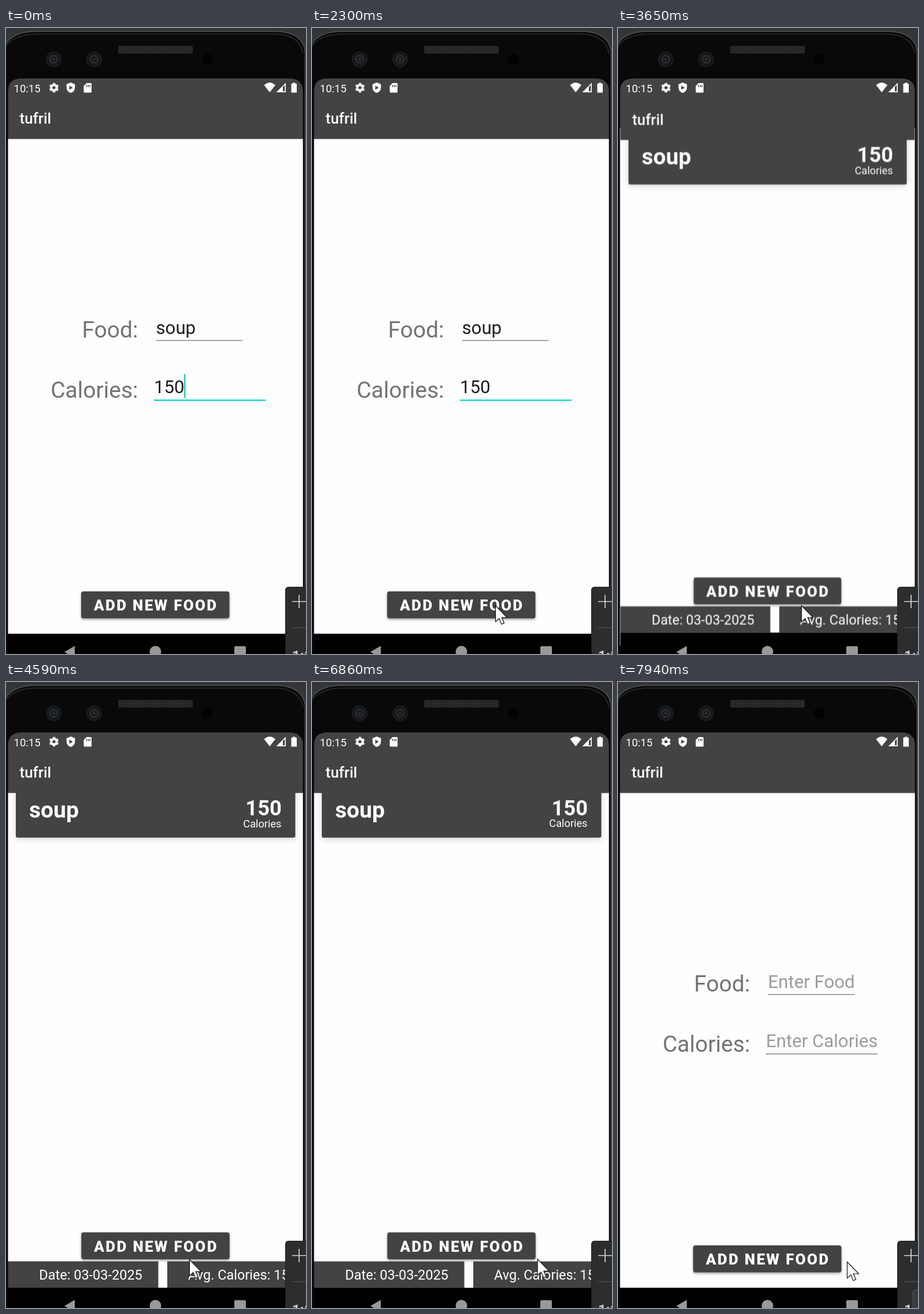
Animation, 519 px wide and 1080 px high, one loop 8 s. Source, as an HTML page:

```html
<!DOCTYPE html>
<html lang="en">
<head>
<meta charset="utf-8">
<title>Calorie tracker demo</title>
<style>
  html, body { margin: 0; width: 100%; height: 100%; overflow: hidden; background: #2f3133; }
  svg { display: block; width: 519px; height: 1080px; }
  text { font-family: Roboto, "Noto Sans", sans-serif; white-space: pre; }
  .dark { fill: #434343; }
  .white { fill: #fff; }
  .title { font-size: 26px; font-weight: 500; fill: #fff; }
  .label { font-size: 39px; fill: #737373; text-anchor: end; }
  .value { font-size: 31.2px; fill: #1d1d1d; }
  .hint { font-size: 31.2px; fill: #9b9b9b; }
  .teal { fill: #0fd8c4; }
  .rule { fill: #767676; }
  .btn-text { font-size: 26px; font-weight: 900; letter-spacing: 2.32px; fill: #fff; }
  .bar { font-size: 23.5px; fill: #fff; }
  .bold { font-weight: 700; }
  .end { text-anchor: end; }
  .raised { filter: drop-shadow(0 2px 2px rgba(0,0,0,.38)); }
  .card { filter: drop-shadow(0 2px 6px rgba(0,0,0,.17)); }

  .anim { animation: 8s linear infinite; }
  .window { transform-origin: 258.5px 597px; }
  #form-old { animation-name: leave-first; }
  #list { animation-name: list-scale, list-fade; }
  #form-new { animation-name: form-scale, form-fade; }
  #list, #form-new { animation-duration: 8s; animation-iteration-count: infinite; }
  #caret { animation-name: blink; animation-timing-function: step-end; }
  #cursor { animation-name: point; }
  #hover { animation-name: hover; animation-timing-function: step-end; }
  #tap1 { animation-name: tap1; }
  #tap1 circle { animation-name: spread1; }
  #tap2 { animation-name: tap2; }
  #tap2 circle { animation-name: spread2; }

  /* Each window change: a fast segment, then a long slow settle */
  @keyframes leave-first {
    0%, 42.7% { transform: scale(1); visibility: visible; animation-timing-function: cubic-bezier(.3,0,.8,.15); }
    43.53% { transform: scale(1.019); animation-timing-function: cubic-bezier(.05,.7,.1,1); }
    47.7% { transform: scale(1.047); visibility: visible; }
    47.71%, 100% { transform: scale(1.047); visibility: hidden; }
  }
  @keyframes list-scale {
    0%, 42.7% { transform: scale(.85); animation-timing-function: cubic-bezier(.3,0,.8,.15); }
    43.53% { transform: scale(.91); animation-timing-function: cubic-bezier(.05,.7,.1,1); }
    47.7%, 85.7% { transform: scale(1); animation-timing-function: cubic-bezier(.3,0,.8,.15); }
    86.53% { transform: scale(1.019); animation-timing-function: cubic-bezier(.05,.7,.1,1); }
    90.7%, 100% { transform: scale(1.047); }
  }
  @keyframes list-fade {
    0%, 43.3% { opacity: 0; }
    44.35%, 100% { opacity: 1; }
  }
  @keyframes form-scale {
    0%, 85.7% { transform: scale(.85); animation-timing-function: cubic-bezier(.3,0,.8,.15); }
    86.53% { transform: scale(.91); animation-timing-function: cubic-bezier(.05,.7,.1,1); }
    90.7%, 100% { transform: scale(1); }
  }
  @keyframes form-fade {
    0%, 86.3% { opacity: 0; }
    87.35%, 100% { opacity: 1; }
  }
  @keyframes blink {
    0% { opacity: 1; }
    1% { opacity: 0; }
    6.85% { opacity: 1; }
    13.6% { opacity: 0; }
    19.5% { opacity: 1; }
    26.9%, 100% { opacity: 0; }
  }
  @keyframes tap1 {
    0%, 20% { opacity: 0; }
    22%, 27% { opacity: 1; }
    28.7%, 100% { opacity: 0; }
  }
  @keyframes spread1 {
    0%, 20% { transform: scale(.1); animation-timing-function: ease-out; }
    25.2%, 100% { transform: scale(1); }
  }
  @keyframes tap2 {
    0%, 62.2% { opacity: 0; }
    63.6%, 66.7% { opacity: 1; }
    69.2%, 100% { opacity: 0; }
  }
  @keyframes spread2 {
    0%, 62.2% { transform: scale(.1); animation-timing-function: ease-out; }
    65.6%, 100% { transform: scale(1); }
  }
  @keyframes point {
    0%, 7.6% { transform: translate(368px,1043px); visibility: hidden; }
    7.61% { transform: translate(368px,1043px); visibility: visible; animation-timing-function: ease-out; }
    15.37%, 57.3% { transform: translate(317px,996px); animation-timing-function: ease-in-out; }
    63.2%, 85.69% { transform: translate(296px,977px); }
    85.7%, 85.75% { transform: translate(389px,995px); }
    88.25% { transform: translate(509px,1014px); }
    91% { transform: translate(513px,1031px); }
    95.1% { transform: translate(503px,1022px); }
    96%, 97.7% { transform: translate(500px,1020px); }
    99.2%, 100% { transform: translate(396px,1000px); visibility: visible; }
  }
  @keyframes hover {
    0% { opacity: 0; }
    97.7%, 100% { opacity: 1; }
  }
</style>
</head>
<body>
<svg viewBox="0 0 519 1080" xmlns="http://www.w3.org/2000/svg">
  <defs>
    <clipPath id="screen"><path d="M3.5 1080V109Q3.5 87 27 87H490Q513.7 87 513.7 109V1080Z"/></clipPath>
    <clipPath id="btn-clip"><rect x="130" y="972" width="256.5" height="46.5" rx="4"/></clipPath>
    <pattern id="mesh" width="3" height="3" patternUnits="userSpaceOnUse">
      <rect width="3" height="3" fill="#1b1b1b"/><circle cx="1.5" cy="1.5" r="1" fill="#414141"/>
    </pattern>
    <radialGradient id="lens">
      <stop offset="0" stop-color="#3c4043"/><stop offset=".25" stop-color="#121416"/>
      <stop offset=".5" stop-color="#282c2f"/><stop offset=".65" stop-color="#121517"/>
      <stop offset="1" stop-color="#1b1f22"/>
    </radialGradient>

    <g id="page">
      <rect x="3" y="87" width="511" height="1020"/>
      <rect x="3" y="190" width="511" height="855" fill="#fefefe"/>
    </g>
    <g id="header">
      <rect class="dark" x="3" y="87" width="511" height="104.5"/>
      <text class="title" x="23.5" y="165">tufril</text>
    </g>
    <g id="button">
      <rect class="dark raised" x="130" y="972" width="256.5" height="46.5" rx="4"/>
      <text class="btn-text" x="152" y="1005">ADD NEW FOOD</text>
    </g>
    <g id="form">
      <use href="#page"/>
      <use href="#header"/>
      <text class="label" x="228.5" y="534">Food:</text>
      <text class="label" x="228.5" y="638">Calories:</text>
      <rect class="rule" x="259.5" y="538.5" width="150" height="1.3"/>
      <use href="#button"/>
    </g>
    <g id="lens-ring">
      <circle r="13.5" fill="url(#lens)"/>
      <circle r="6" fill="none" stroke="#34383b" stroke-width=".8"/>
    </g>
  </defs>

  <!-- Phone body -->
  <rect width="519" height="1080" fill="#333538"/>
  <path d="M-4 1090V36Q4 9 45 6H472Q513 9 517.5 40V1090Z" fill="#090909" stroke="#505254" stroke-width="1.6"/>
  <path d="M-3 38Q6 13 48 10.5H469Q508 13 514 44" fill="none" stroke="#242526" stroke-width="2"/>
  <rect x="194" y="31" width="129" height="13" rx="2" fill="url(#mesh)"/>
  <use href="#lens-ring" x="82.5" y="54"/>
  <use href="#lens-ring" x="152.5" y="54"/>
  <circle cx="348" cy="54" r="9.5" fill="#020203"/>

  <g clip-path="url(#screen)">
    <rect y="87" width="519" height="993"/>

    <g id="form-old" class="anim window">
      <use href="#form"/>
      <text class="value" x="259.5" y="528">soup</text>
      <text class="value" x="256" y="630">150</text>
      <rect class="teal" x="256" y="641" width="193" height="2.4"/>
      <rect id="caret" class="anim teal" x="308" y="597" width="2.6" height="41.5"/>
      <g clip-path="url(#btn-clip)">
        <g id="tap1" class="anim white">
          <rect x="130" y="972" width="257" height="47" opacity=".24"/>
          <g transform="translate(317 996)"><circle class="anim" r="200" opacity=".24"/></g>
        </g>
      </g>
    </g>

    <g id="list" class="window">
      <use href="#page"/>
      <rect class="dark card" x="17" y="176" width="483.5" height="92.5" rx="3"/>
      <use href="#header"/>
      <text x="40" y="234" font-size="39" class="white bold">soup</text>
      <text x="477" y="230" font-size="36.4" class="white bold end">150</text>
      <text x="476.5" y="250.5" font-size="18.2" class="white end">Calories</text>
      <rect class="dark" x="3" y="999.5" width="260.5" height="45.5"/>
      <rect class="dark" x="279" y="999.5" width="235" height="45.5"/>
      <text class="bar" x="57.3" y="1031">Date: 03-03-2025</text>
      <text class="bar" x="315" y="1031">Avg. Calories: 150</text>
      <g transform="translate(.3 -22.5)">
        <use href="#button"/>
        <g clip-path="url(#btn-clip)">
          <g id="tap2" class="anim white">
            <rect x="130" y="972" width="257" height="47" opacity=".24"/>
            <g transform="translate(296 999)"><circle class="anim" r="200" opacity=".24"/></g>
          </g>
        </g>
      </g>
    </g>

    <g id="form-new" class="window">
      <use href="#form"/>
      <text class="hint" x="259.5" y="528">Enter Food</text>
      <text class="hint" x="256" y="630">Enter Calories</text>
      <rect class="rule" x="256" y="641" width="193" height="1.3"/>
    </g>

    <!-- Status bar -->
    <g class="white">
      <text x="13.5" y="110.5" font-size="18.5">10:15</text>
      <g transform="translate(83 103) rotate(30)" fill="none" stroke="#fff">
        <circle r="4.7" stroke-width="4"/>
        <circle r="7.1" stroke-width="2.4" stroke-dasharray="3.9 3.535" stroke-dashoffset="2"/>
      </g>
      <path d="M112 94L119.3 97V103Q119 109.5 112 112Q105 109.5 104.7 103V97Z"/>
      <path class="dark" d="M109.5 99.5V106.5L115.5 103Z"/>
      <path d="M139.5 95H146.5Q148 95 148 96.5V110Q148 111.5 146.5 111.5H136Q134.5 111.5 134.5 110V100Z"/>
      <path d="M139.5 98V102M142.5 98V102M145.3 98V102" stroke="#434343" stroke-width="1.3"/>
      <path d="M446.5 98.5Q456.2 90 466 98.5L456.2 111Z"/>
      <path d="M484 94.5V111H467.5Z"/>
      <path d="M479 101.5L482.3 98.5V109.3H479Z" class="dark"/>
      <path d="M496 94.5H500.5V96H503V111.5H493.5V96H496Z"/>
    </g>

    <!-- Navigation keys -->
    <g fill="#999">
      <path d="M101 1076.5L119 1066V1087Z"/>
      <circle cx="258.5" cy="1076" r="10"/>
      <rect x="395" y="1066.5" width="20" height="20" rx="2"/>
    </g>
  </g>

  <!-- Side toolbar -->
  <path d="M483.5 1082V970Q483.5 964.5 489 964.5H521V1082Z" fill="#2b2d2f" stroke="#1d1f20"/>
  <path d="M495 989.5H519M507 978V1001" stroke="#d4d6d8" stroke-width="1.7"/>
  <path d="M495 1034.5H519" stroke="#515456" stroke-width="1.2"/>
  <text x="495" y="1091" font-size="24" class="bold" fill="#c9cbcd">1:1</text>
  <rect id="hover" class="anim" x="510" y="1048.5" width="20" height="40" rx="5" fill="#393b3e" stroke="#55585b"/>

  <path id="cursor" class="anim" d="M.5 .5V28.5L6.8 22.7L11 32.7L15.5 30.8L11.2 21H20.5Z"
        fill="#fff" stroke="#111" stroke-width="1.2"/>
</svg>
</body>
</html>
```
